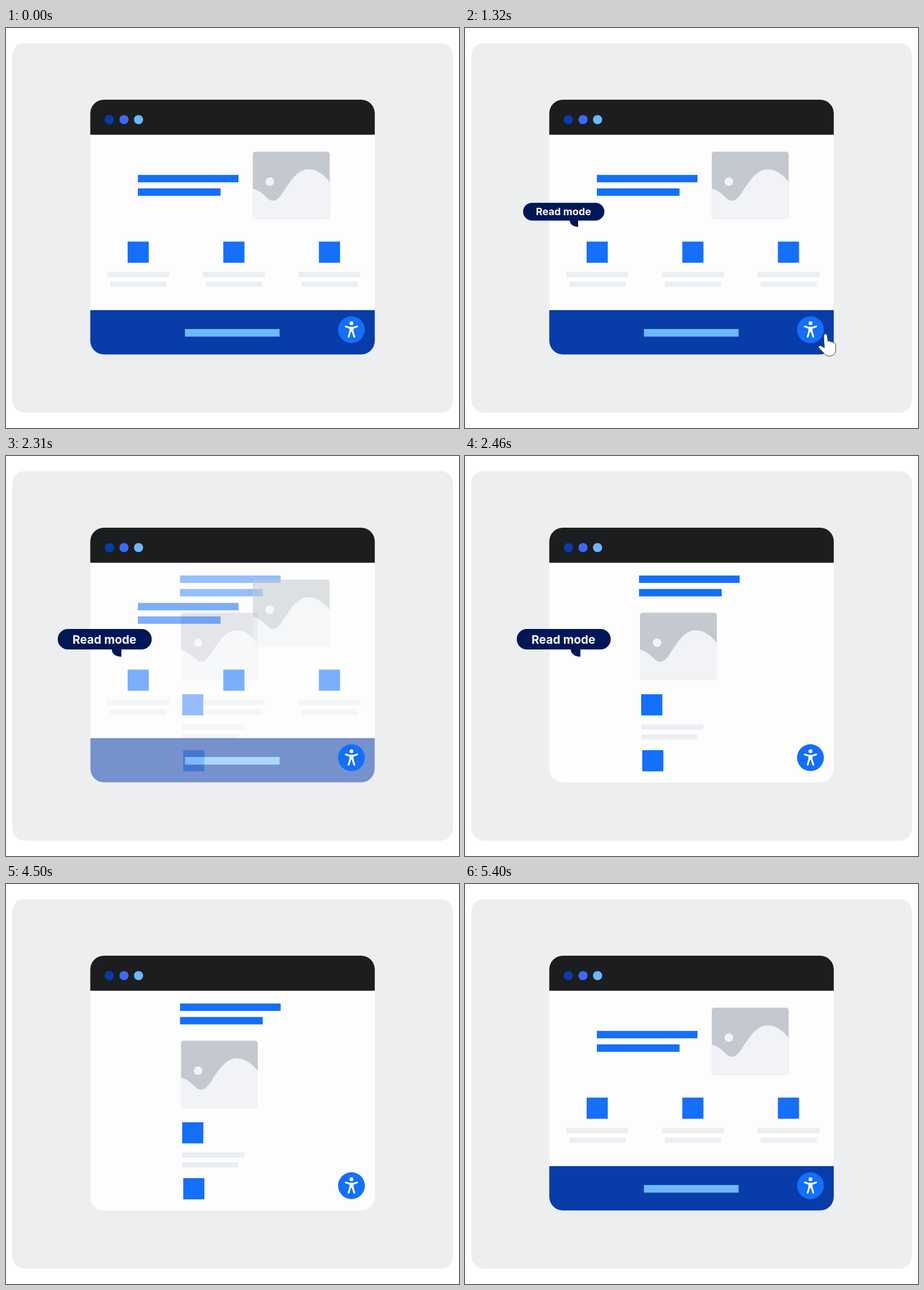
Recreate the animation shown at these times as an HTML page. Size 797 px wide and 703 px high, loop 6300 ms.

```html
<!DOCTYPE html>
<html lang="en">
<head>
<meta charset="utf-8">
<title>Read mode</title>
<style>
  html, body { margin: 0; width: 100%; height: 100%; overflow: hidden; background: #fff; }
  svg { display: block; width: 797px; height: 703px; }
  .blue { fill: #146ffb; }
  .pale { fill: #ebeef3; }
  .navy { fill: #001757; }
  text { font: 700 20.6px Inter, sans-serif; fill: #fff; text-anchor: middle; }
</style>
</head>
<body>
<svg viewBox="0 0 797 703">
  <defs>
    <clipPath id="windowClip"><rect x="148.3" y="126" width="500.5" height="447.8" rx="24"/></clipPath>
    <clipPath id="pictureClip"><rect width="135.4" height="118.3" rx="5"/></clipPath>
    <g id="picture" clip-path="url(#pictureClip)">
      <rect width="136" height="119" fill="#c3c9cf"/>
      <path d="M0 65C12 68 20 76 26 82C32 88 40 88 47 80C58 68 73 31 98 31C113 31 126 41 136 54V119H0Z" fill="#f1f3f6"/>
      <circle cx="30.2" cy="52.8" r="7.6" fill="#f1f3f6"/>
    </g>
    <g id="heading" class="blue">
      <rect width="177" height="13"/>
      <rect y="23.7" width="145.5" height="13"/>
    </g>
    <rect id="tile" class="blue" width="37.2" height="37.2"/>
    <g id="column">
      <use href="#tile" x="36" y="-53"/>
      <rect class="pale" width="109" height="9.4"/>
      <rect class="pale" x="5.5" y="17.3" width="98.5" height="9.4"/>
    </g>
  </defs>

  <rect x="11" y="26.4" width="775.4" height="649.8" rx="22" fill="#edeef0"/>
  <g clip-path="url(#windowClip)">
    <rect x="148" y="126" width="502" height="448" fill="#fdfdfd"/>
    <rect x="148" y="126" width="502" height="61.6" fill="#1c1d1f"/>
    <circle cx="182" cy="161" r="8.1" fill="#083ca8"/>
    <circle cx="207.6" cy="161" r="8.1" fill="#3b69fc"/>
    <circle cx="233.2" cy="161" r="8.1" fill="#6bb8fc"/>

    <g id="readView">
      <use href="#heading" x="306.2" y="210"/>
      <use href="#picture" x="307.7" y="275.2"/>
      <use href="#tile" x="310" y="418.7"/>
      <rect class="pale" x="310" y="471.7" width="109.4" height="9.4"/>
      <rect class="pale" x="310" y="489" width="98.4" height="9.4"/>
      <use href="#tile" x="311.8" y="517"/>
    </g>

    <g id="pageView">
      <use href="#heading" x="232" y="258.2"/>
      <use href="#picture" x="434.1" y="217.2"/>
      <use href="#column" x="178" y="428.4"/>
      <use href="#column" x="346.3" y="428.4"/>
      <use href="#column" x="514.5" y="428.4"/>
      <rect x="148" y="495.8" width="502" height="78.2" fill="#083ca8"/>
      <rect x="314.8" y="529" width="166.6" height="13.4" fill="#6bb8fe"/>
    </g>
  </g>

  <g transform="translate(607.8 530.2)">
    <circle class="blue" r="23.6"/>
    <circle cy="-11.3" r="3.3" fill="#fff"/>
    <path d="M-10-5.6L-3.4-3.5H3.4L10-5.6M-2-3V2.5L-5 12.4M2-3V2.5L5 12.4M0-3V2"
          fill="none" stroke="#fff" stroke-width="3.2" stroke-linecap="round" stroke-linejoin="round"/>
  </g>

  <g id="tooltip">
    <rect class="navy" x="91" y="304" width="165.4" height="36" rx="18"/>
    <path class="navy" d="M186 339C186 348 193 352.7 203 352.7V339Z"/>
    <text x="173.2" y="329.6">Read mode</text>
  </g>

  <path id="cursor" fill="#fff" stroke="#3a3a3c" stroke-width="1" stroke-linejoin="round"
        d="M9.6 4.2C9.6-.4 15.4-.4 16 4L17.2 14.4C18.2 12 22 12.6 22.2 15.4C23.4 13.4 26.4 14.2 26.8 16.8C28.6 15.4 30.6 16.8 30.6 19V29C30.6 36 25.6 39.6 20 39.6C15 39.6 11.6 37 9 33.4L1.2 25.4C-.8 22.8 2.4 20 5.4 21.8L10.8 25Z"/>
</svg>
<script>
const LOOP = 6300, STEP = 30;
const byId = id => document.getElementById(id);
const [readView, pageView, tooltip, cursor] =
  ["readView", "pageView", "tooltip", "cursor"].map(byId);

const progress = (t, start, end) => Math.min(1, Math.max(0, (t - start) / (end - start)));
const smooth = u => u * u * (3 - 2 * u);

// Distance along a quarter ellipse: 0 rests on the button, 1 is below the stage.
function placeCursor(away) {
  const angle = away * Math.PI / 2;
  const x = 604.3 + 130 * Math.sin(angle);
  const y = 535.5 + 168 * (1 - Math.cos(angle));
  cursor.setAttribute("transform", `translate(${x} ${y})`);
}

function draw(t) {
  const arriving = (1 - progress(t, 30, 600)) ** 2;
  const leaving = progress(t, 780, 2130) ** 2.7;
  placeCursor(t < 780 ? arriving : leaving);
  cursor.style.display = t > 30 && t < 2130 ? "" : "none";

  const scale = smooth(progress(t, 840, 1464)) - smooth(progress(t, 3900, 4500));
  tooltip.style.display = scale > 0 ? "" : "none";
  tooltip.setAttribute("transform", `translate(173.6 328.4) scale(${scale}) translate(-173.6 -328.4)`);

  const reading = progress(t, 2190, 2460) - progress(t, 5130, 5400);
  readView.setAttribute("opacity", reading);
  pageView.setAttribute("opacity", 1 - reading);
}

function tick() {
  const t = performance.now() % LOOP;
  draw(t - t % STEP);
  requestAnimationFrame(tick);
}
tick();
</script>
</body>
</html>
```
